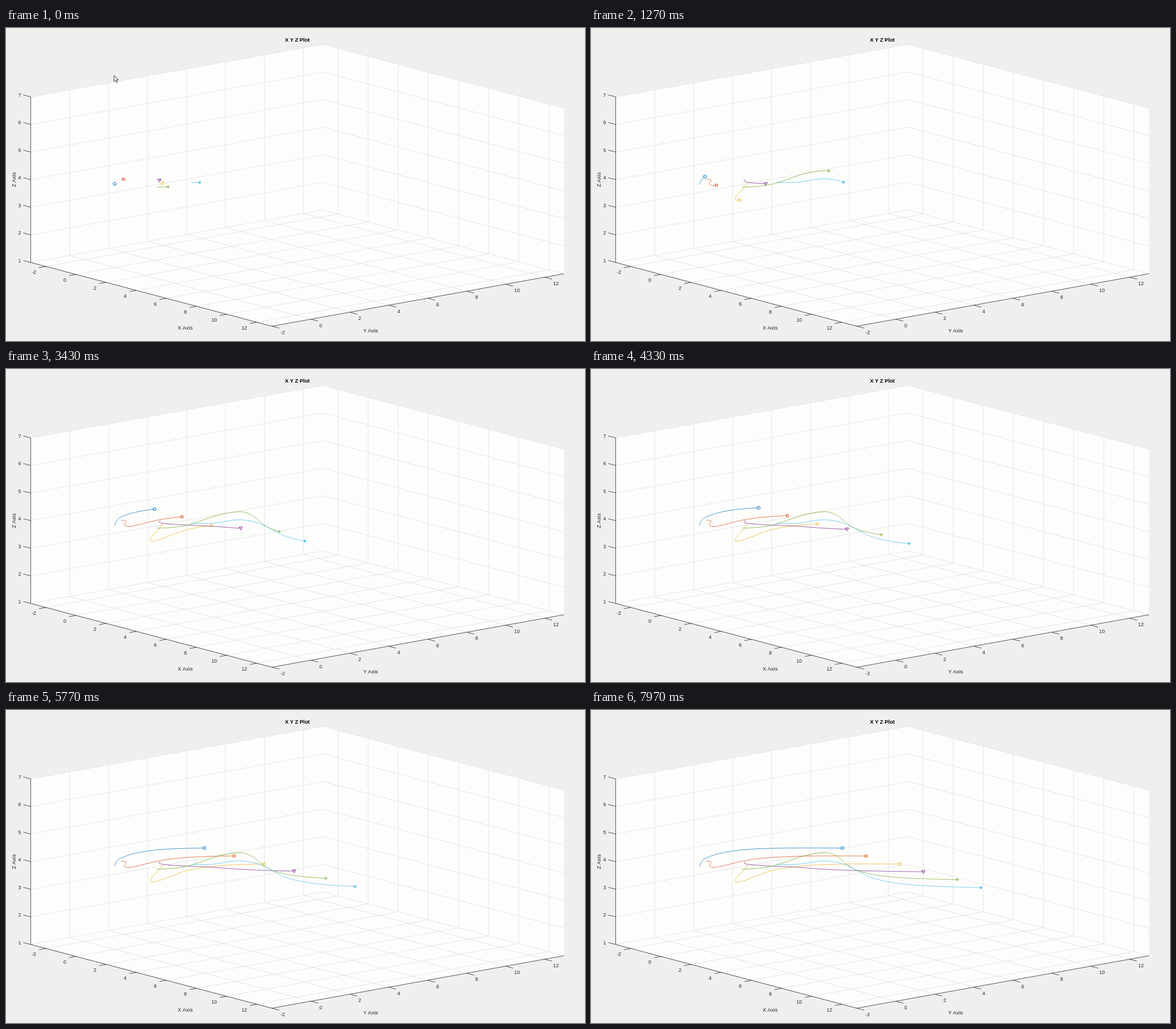
An HTML page that plays this animation: 1018x550 px, repeating every 8000 ms.

```html
<!DOCTYPE html>
<html lang="en">
<head>
<meta charset="utf-8">
<title>X Y Z Plot</title>
<style>
  html, body { margin: 0; width: 100%; height: 100%; overflow: hidden; background: #eff0ed; }
  svg { display: block; width: 100vw; height: 100vh; }
  text { font-family: "Liberation Sans", Arial, sans-serif; font-size: 8.8px; fill: #262626; }
  .label { font-size: 9.5px; text-anchor: middle; }
  .title { font-size: 9.4px; font-weight: bold; text-anchor: middle; fill: #000; }
  .end { text-anchor: end; }
  .wall { fill: #fdfdfc; }
  .grid { stroke: #e5e5e6; fill: none; }
  .axis { stroke: #404040; stroke-width: .9; fill: none; }
  .trail { fill: none; stroke-width: 1; stroke-linejoin: round; opacity: .78; }
  .mark { fill: none; stroke-width: 1; }
  #cursor { fill: #fff; stroke: #333; stroke-width: 1; animation: leave 8s linear infinite; }
  @keyframes leave {
    0%, 10.9% { transform: translate(190px, 83.5px); }
    13.7%, 100% { transform: translate(190px, -20px); }
  }
</style>
</head>
<body>
<svg viewBox="0 0 1018 550" preserveAspectRatio="none">
  <g id="plot"></g>
  <g id="curves"></g>
  <path id="cursor" d="M0 0V10.5L2.5 8.3L4.2 12.2L6 11.4L4.4 7.6H7.6Z"/>
</svg>
<script>
const plot = document.getElementById('plot');
const curves = document.getElementById('curves');

function add(parent, tag, attrs, text) {
  const el = document.createElementNS('http://www.w3.org/2000/svg', tag);
  for (const key in attrs) el.setAttribute(key, attrs[key]);
  if (text !== undefined) el.textContent = text;
  parent.appendChild(el);
  return el;
}

// Orthographic view of the box x -3..13, y -2..13, z 1..7
const project = (x, y, z) => [
  43.4 + 26.5 * (x + 3) + 34.25 * (y + 2),
  412 + 7 * (x + 3) - 6.15 * (y + 2) - 48.5 * (z - 1)
];
const pathOf = pts => 'M' + pts.map(p => p.map(v => v.toFixed(2)).join(' ')).join('L');
const line = (cls, ...pts) =>
  add(plot, 'path', { class: cls, d: pathOf(pts.map(p => project(...p))) });

function tick([x, y], dx, dy, tx, ty, text, cls) {
  add(plot, 'path', { class: 'axis', d: `M${x} ${y}l${dx} ${dy}` });
  add(plot, 'text', { x: x + tx, y: y + ty, class: cls }, text);
}

function drawAxes() {
  line('wall', [-3, -2, 1], [-3, -2, 7], [-3, 13, 7], [13, 13, 7], [13, 13, 1], [13, -2, 1]);
  for (let v = -2; v <= 12; v += 2) {
    line('grid', [v, -2, 1], [v, 13, 1], [v, 13, 7]);
    line('grid', [13, v, 1], [-3, v, 1], [-3, v, 7]);
  }
  for (let z = 1; z <= 7; z++) line('grid', [-3, -2, z], [-3, 13, z], [13, 13, z]);

  line('axis', [-3, -2, 7], [-3, -2, 1], [13, -2, 1], [13, 13, 1]);
  for (let v = -2; v <= 12; v += 2) {
    tick(project(v, -2, 1), -12, 2.2, -16.9, 12.5, v, 'end');
    tick(project(13, v, 1), 13, 3.4, 15.2, 13.8, v, '');
  }
  for (let z = 1; z <= 7; z++) tick(project(-3, -2, z), -13, -3.4, -16.9, -.3, z, 'end');

  add(plot, 'text', { x: 512.3, y: 23.6, class: 'title' }, 'X Y Z Plot');
  add(plot, 'text', { x: 315, y: 530, class: 'label' }, 'X Axis');
  add(plot, 'text', { x: 641, y: 535, class: 'label' }, 'Y Axis');
  add(plot, 'text', { class: 'label', transform: 'translate(17 266.5) rotate(-90)' }, 'Z Axis');
}

// Each marker wanders through a few points, then settles into its slot of a
// moving diagonal formation, and near the end is pushed along it.
const KEYS = [-.2, .29, .78, 1.27, 2.53];
const LAST = KEYS.length - 1;
const DECAY = .75, PUSH_AT = 6.95;

const slot = (i, t) => [392 + 53 * i + 38.3 * (t - 6.9), 242 + 14 * i + .4 * (t - 6.9)];

function settle(i, from, t, push) {
  const home = slot(i, KEYS[LAST]), now = slot(i, t);
  const fade = Math.exp(-DECAY * (t - KEYS[LAST]));
  const shift = push * Math.max(0, t - PUSH_AT) ** 2;
  return now.map((v, c) => v + (from[c] - home[c]) * fade + (c ? 0 : shift));
}

// Slope at key k for one coordinate; the last one joins the settling motion
function slope(p, k, endSlope) {
  if (k === LAST) return endSlope;
  if (k > 0) return (p[k + 1] - p[k - 1]) / (KEYS[k + 1] - KEYS[k - 1]);
  return 1.5 * (p[1] - p[0]) / (KEYS[1] - KEYS[0]) - .5 * slope(p, 1, endSlope);
}

function wander(p, t, endSlope) {
  const k = KEYS.findIndex((v, n) => t <= KEYS[n + 1]);
  const h = KEYS[k + 1] - KEYS[k], u = (t - KEYS[k]) / h, w = 1 - u;
  return w * w * ((1 + 2 * u) * p[k] + u * h * slope(p, k, endSlope))
    + u * u * ((1 + 2 * w) * p[k + 1] - w * h * slope(p, k + 1, endSlope));
}

function position({ keys, push }, i, t) {
  const from = keys[LAST];
  if (t >= KEYS[LAST]) return settle(i, from, t, push);
  const next = settle(i, from, KEYS[LAST] + .01, push);
  return from.map((v, c) => wander(keys.map(p => p[c]), t, (next[c] - v) / .01));
}

const bodies = [
  { color: '#0072bd', shape: 'M-2.7 0a2.7 2.7 0 1 0 5.4 0a2.7 2.7 0 1 0 -5.4 0Z', push: 9,
    keys: [[191, 275], [191.8, 271.5], [195.3, 265.5], [200.5, 261], [228.5, 251.5]] },
  { color: '#d95319', shape: 'M-2 -2H2V2H-2Z', push: -2,
    keys: [[202.5, 266], [211, 267], [208.5, 275], [220.5, 276.3], [272, 264.5]] },
  { color: '#edb120', shape: 'M0 -3.2L2.4 0L0 3.2L-2.4 0Z', push: 4,
    keys: [[276, 270], [271, 278.5], [254, 298], [261.5, 302], [323, 281]] },
  { color: '#7e2f8e', shape: 'M-3 -2.2H3L0 3Z', push: -7,
    keys: [[272, 266.5], [269.5, 269.5], [283, 272], [307.5, 273.8], [373, 277]] },
  { color: '#77ac30', shape: 'M-3 0H3M0 -3V3', push: -1,
    keys: [[265, 279.5], [316, 275], [376, 256], [418, 251.3], [454.5, 274.5]] },
  { color: '#4dbeee', shape: 'M-2.8 0H2.8M0 -2.8V2.8M-1.9 -1.9L1.9 1.9M-1.9 1.9L1.9 -1.9', push: -12,
    keys: [[326, 271], [363, 271], [409, 265], [444, 271], [492, 294]] }
];

const RATE = 30, LEAD = 6, STEPS = 8 * RATE;

function prepare(body, i) {
  body.pts = Array.from({ length: LEAD + STEPS }, (_, n) => position(body, i, (n - LEAD) / RATE));
  body.trail = add(curves, 'path', { class: 'trail', stroke: body.color });
  body.mark = add(curves, 'path', { class: 'mark', stroke: body.color, d: body.shape });
}

function show(step) {
  for (const { pts, trail, mark } of bodies) {
    const passed = pts.slice(0, step + LEAD + 1);
    trail.setAttribute('d', pathOf(passed));
    mark.setAttribute('transform', `translate(${passed[passed.length - 1]})`);
  }
}

let start = null, shown = -1;

function frame(now) {
  if (start === null) start = now;
  const ms = (now - start) % 8000;
  const step = Math.min(Math.floor((ms + 4) * RATE / 1000), STEPS - 1);
  if (step !== shown) show(shown = step);
  requestAnimationFrame(frame);
}

drawAxes();
bodies.forEach(prepare);
frame(performance.now());
</script>
</body>
</html>
```
